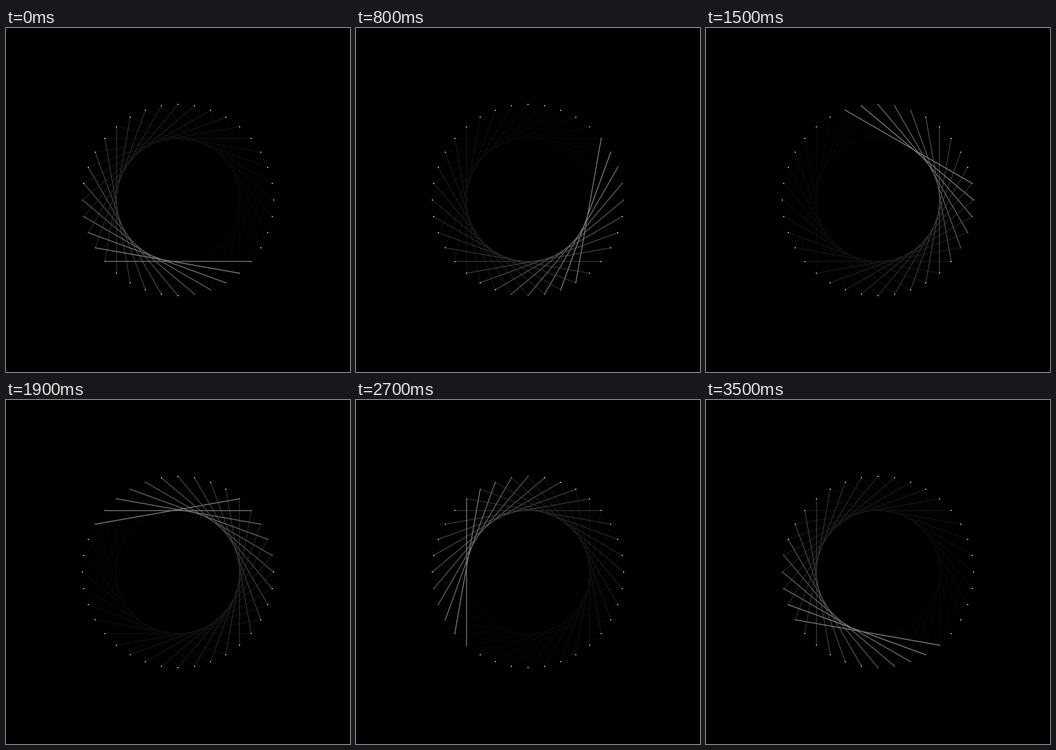
Write an HTML page with a canvas that moves like this. It is 748 by 748 pixels and loops after 3.6 s.

```html
<!DOCTYPE html>
<html lang="en">
<head>
<meta charset="utf-8">
<title>Chord circle</title>
<style>
  html, body { margin: 0; width: 100%; height: 100%; overflow: hidden; background: #000; }
  canvas { display: block; }
</style>
</head>
<body>
<canvas id="stage" width="748" height="748"></canvas>
<script>
  const ctx = document.getElementById('stage').getContext('2d');
  const COUNT = 36, STEP_MS = 100, CENTER = 374, RADIUS = 207.8;
  const HALF_SPAN = 50, COVERING = 5;

  function pointAt(deg) {
    const a = deg * Math.PI / 180;
    return [CENTER + RADIUS * Math.cos(a), CENTER + RADIUS * Math.sin(a)];
  }

  function drawChord(step, age) {
    const mid = 90 - 10 * (step - age);
    const gray = Math.round(115 * Math.pow(0.89, Math.max(0, age - 1)));
    ctx.strokeStyle = `rgb(${gray}, ${gray}, ${gray})`;
    ctx.beginPath();
    ctx.moveTo(...pointAt(mid - HALF_SPAN));
    ctx.lineTo(...pointAt(mid + HALF_SPAN));
    ctx.stroke();
  }

  function drawDots() {
    ctx.fillStyle = '#fff';
    for (let i = 0; i < COUNT; i++) {
      const [x, y] = pointAt(i * 10);
      ctx.fillRect(Math.round(x - 1), Math.round(y - 1), 2, 2);
    }
  }

  function draw(step) {
    ctx.fillStyle = '#000';
    ctx.fillRect(0, 0, 748, 748);
    ctx.lineWidth = 2;
    ctx.lineCap = 'square';
    // The newest chords lie over the dots, the faded ones under them.
    for (let age = COUNT - 1; age >= 0; age--) {
      if (age === COVERING - 1) drawDots();
      drawChord(step, age);
    }
  }

  const start = performance.now();
  function tick() {
    const elapsed = performance.now() - start;
    draw(Math.floor(elapsed / STEP_MS) % COUNT);
    requestAnimationFrame(tick);
  }
  tick();
</script>
</body>
</html>
```
